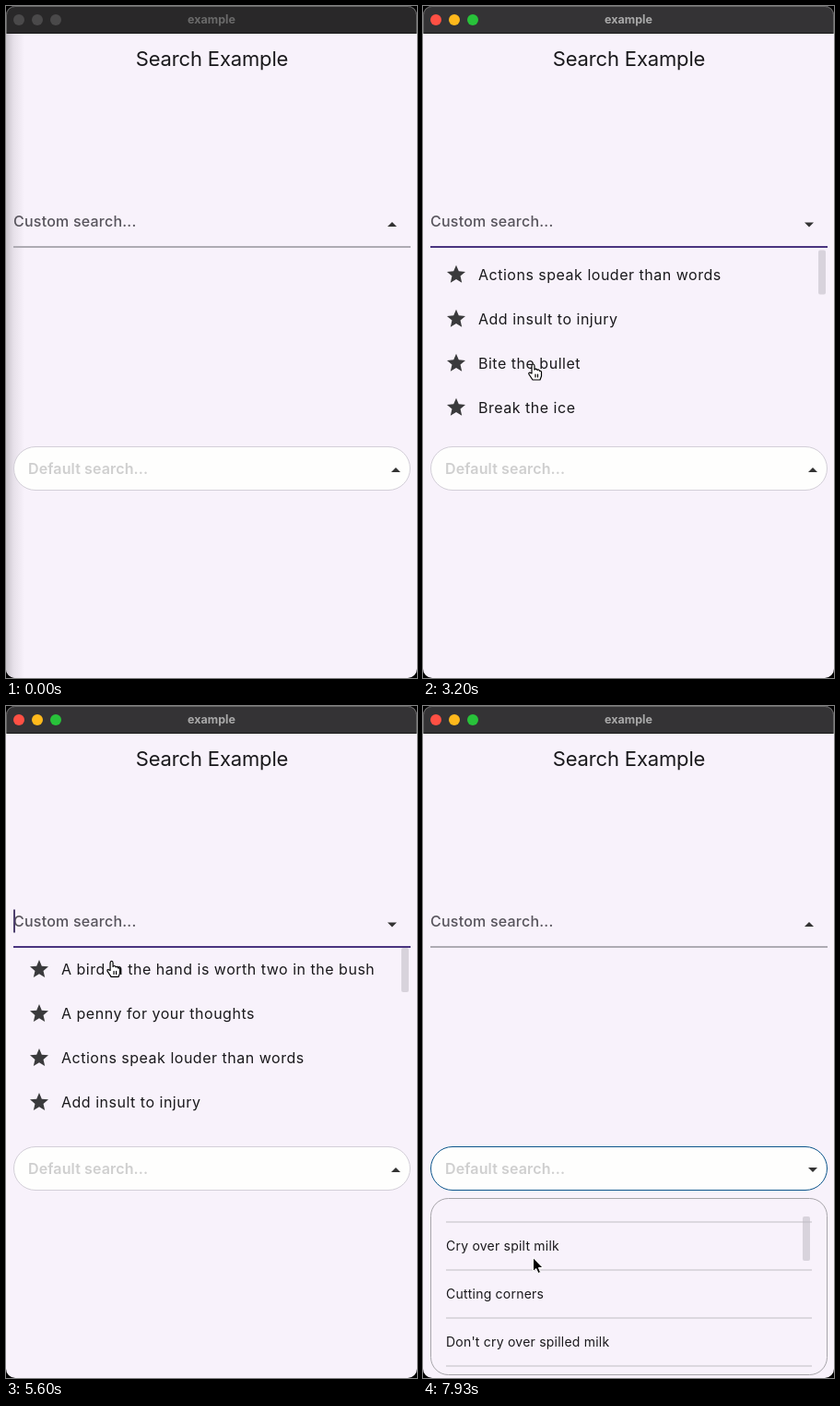
Animation of 446 by 728 pixels, one loop 8 s. Source, as an HTML page:

```html
<!DOCTYPE html>
<html lang="en">
<head>
<meta charset="utf-8">
<title>example</title>
<style>
  html, body { margin: 0; width: 100%; height: 100%; overflow: hidden; background: #000; }
  svg { display: block; width: 446px; height: 728px; }
  text { font-family: Inter, Roboto, sans-serif; fill: #1a191c; white-space: pre; }
  .app-title { font-size: 22px; letter-spacing: -0.15px; }
  .window-title { font-size: 12.5px; font-weight: 700; }
  .hint { font-size: 16px; font-weight: 500; letter-spacing: 0.22px; fill: #57545c; }
  .pale { font-weight: 600; letter-spacing: 0.13px; fill: #cfcfcf; }
  .item { font-size: 16px; letter-spacing: 0.51px; }
  .small { font-size: 14px; letter-spacing: 0.22px; }
  .star { fill: #3a3a3c; }
  .thumb { fill: #bebac2; fill-opacity: 0.55; }
  .cursor path { stroke-linejoin: round; stroke-linecap: round; }
</style>
</head>
<body>
<svg viewBox="0 0 446 728">
  <defs>
    <linearGradient id="edge">
      <stop offset="0" stop-color="#c6c2c9"/>
      <stop offset=".4" stop-color="#e6e0e9"/>
      <stop offset="1" stop-color="#f8f2fb"/>
    </linearGradient>
    <clipPath id="window"><rect width="446" height="728" rx="10"/></clipPath>
    <clipPath id="customView"><rect x="8" y="262" width="431" height="198"/></clipPath>
    <clipPath id="defaultView"><rect x="9" y="541" width="429" height="176"/></clipPath>
  </defs>

  <g clip-path="url(#window)">
    <rect width="446" height="728" fill="#f8f2fb"/>
    <rect id="shadow" y="30" width="20" height="698" fill="url(#edge)"/>
    <rect id="bar" width="446" height="30"/>
    <path d="M0 29.5H446" stroke="#181818"/>
    <path d="M.5 30V10A9.5 9.5 0 0 1 10 .5H436A9.5 9.5 0 0 1 445.5 10V30" fill="none" stroke="#666"/>
  </g>
  <g id="lights"><circle cx="14" cy="15" r="6"/><circle cx="34" cy="15" r="6"/><circle cx="54" cy="15" r="6"/></g>
  <text id="windowTitle" class="window-title" x="223" y="19" text-anchor="middle">example</text>
  <text class="app-title" x="223.5" y="65" text-anchor="middle">Search Example</text>

  <g id="customList" clip-path="url(#customView)">
    <rect id="hover" x="8" width="431" height="48" fill="#ebe4ec"/>
    <g id="customRows"></g>
    <rect id="customThumb" class="thumb" x="429" width="8" height="48" rx="2"/>
  </g>
  <text class="hint" x="8" y="239">Custom search...</text>
  <path id="underline" d="M8 261H439" stroke-width="2"/>
  <path id="customArrow" fill="#333"/>

  <rect id="pill" x="8.5" y="477.5" width="430" height="47" rx="23.5"/>
  <text class="hint pale" x="24" y="507">Default search...</text>
  <path id="defaultArrow" fill="#333"/>

  <g id="defaultList">
    <rect x="8.5" y="533.5" width="430" height="191" rx="19" fill="none" stroke="#a7a5aa"/>
    <g clip-path="url(#defaultView)">
      <g id="defaultRows"></g>
      <rect id="defaultThumb" class="thumb" x="412" width="8" height="48" rx="2"/>
    </g>
  </g>
  <path id="customCaret" d="M9 220.5V245.5" stroke="#4c3f6e" stroke-width="2"/>
  <path id="defaultCaret" d="M25 488.5V513.5" stroke="#4c3f6e" stroke-width="2"/>

  <g id="ibeam" class="cursor">
    <path d="M-3-7Q0-7 0-5Q0-7 3-7M0-5V5M-3 7Q0 7 0 5Q0 7 3 7M-2 2H2" fill="none" stroke="#fff" stroke-width="3"/>
    <path d="M-3-7Q0-7 0-5Q0-7 3-7M0-5V5M-3 7Q0 7 0 5Q0 7 3 7M-2 2H2" fill="none" stroke="#000" stroke-width="1.2"/>
  </g>
  <g id="hand" class="cursor">
    <path d="M-3 1V-7Q-3-9-1.5-9Q0-9 0-7V-3Q2-5 3-2.500Q5-4 5.500-1.500Q8-2 7.500 1V4L6 8H-2L-6 2Q-7-1-3 1ZM1 2V5M3.500 2V5" fill="#fff" stroke="#000" stroke-width="1.2"/>
  </g>
  <g id="arrow" class="cursor">
    <path d="M0 0V14.500L3.300 11.500L5.500 16.500L8 15.400L5.900 10.500H10.300Z" fill="#000" stroke="#fff"/>
  </g>
</svg>

<script>
const LOOP = 8000;
const ACTIVATE = 70, ENTER = 600, OPEN_CUSTOM = 2500, CLOSE_CUSTOM = 6050, OPEN_DEFAULT = 7100;
const ROW = 48, SMALL_ROW = 52;
const STAR = "M12 17.27L18.18 21l-1.64-7.03L22 9.24l-7.19-.61L12 2 9.19 8.63 2 9.24l5.46 4.73L5.82 21z";
const idioms = [
  "A bird in the hand is worth two in the bush", "A penny for your thoughts",
  "Actions speak louder than words", "Add insult to injury", "Bite the bullet",
  "Break the ice", "Burn the midnight oil", "Call it a day", "Caught red-handed",
  "Chip on your shoulder", "Cry over spilt milk", "Cutting corners",
  "Don't cry over spilled milk", "Every cloud has a silver lining", "Get out of hand"
];

const $ = id => document.getElementById(id);
const set = (id, attrs) => {
  for (const name in attrs) $(id).setAttribute(name, attrs[name]);
};
const show = (id, on) => set(id, { visibility: on ? "inherit" : "hidden" });
const between = (t, a, b) => t >= a && t < b;
const blink = (t, start) => Math.floor((t - start) / 500) % 2 === 0;

// Eased value along [time, value] keys.
function track(t, keys) {
  if (t <= keys[0][0]) return keys[0][1];
  for (let i = 1; i < keys.length; i++) {
    const [t0, v0] = keys[i - 1], [t1, v1] = keys[i];
    if (t < t1) {
      const p = (t - t0) / (t1 - t0);
      return v0 + (v1 - v0) * p * p * (3 - 2 * p);
    }
  }
  return keys[keys.length - 1][1];
}

$("customRows").innerHTML = idioms.map((s, i) => `<g transform="translate(0 ${261 + ROW * i})">
  <path class="star" d="${STAR}" transform="translate(24 12)"/><text class="item" x="60" y="30">${s}</text></g>`).join("");
$("defaultRows").innerHTML = idioms.map((s, i) => `<g transform="translate(0 ${541 + SMALL_ROW * i})">
  <text class="item small" x="25" y="31">${s}</text><path d="M25 52H422" stroke="#dcd8df" stroke-width="2"/></g>`).join("");

const pointerX = [[ENTER, -8], [2000, 86], [2460, 86], [2960, 121], [5250, 121], [5800, 114], [6150, 114], [6700, 121], [7150, 121], [7400, 119.5]];
const pointerY = [[ENTER, 330], [2000, 235], [2460, 235], [2960, 397], [5250, 397], [5800, 238], [6150, 238], [6700, 510], [7150, 510], [7400, 598]];
const customScroll = [[2900, 0], [3930, 438], [4050, 438], [4600, 79], [4850, 79], [5200, 0]];
const defaultScroll = [[7350, 0], [7930, 502]];

// True when a track has rested long enough for the hover tint to appear.
const settled = (t, keys) => track(t, keys) === track(t - 100, keys);

function arrowPath(x, y, open) {
  const d = open ? -1 : 1;
  return `M${x - 5} ${y + 2.5 * d}H${x + 5}L${x} ${y - 2.5 * d}Z`;
}

function drawWindow(t) {
  const active = t >= ACTIVATE;
  show("shadow", !active);
  set("bar", { fill: active ? "#343335" : "#292829" });
  set("windowTitle", { style: `fill:${active ? "#a9a9a9" : "#6a6a6a"}` });
  ["#ff5044", "#ffb91c", "#28c23a"].forEach((color, i) =>
    $("lights").children[i].setAttribute("fill", active ? color : "#4a494a"));
}

function drawCustom(t, y) {
  const open = between(t, OPEN_CUSTOM, CLOSE_CUSTOM);
  const offset = track(t, customScroll);
  show("customList", open);
  set("customRows", { transform: `translate(0 ${-offset})` });
  set("customThumb", {
    y: 262 + offset * 0.0274,
    opacity: track(t, [[2900, 0], [3000, 1], [5700, 1], [6000, 0]])
  });
  const fingertip = y - 9;
  const row = Math.floor((fingertip - 261 + offset) / ROW);
  set("hover", { y: 261 + row * ROW - offset });
  show("hover", open && fingertip > 261 && settled(t, customScroll) && settled(t, pointerY));
  show("customCaret", open && blink(t, OPEN_CUSTOM));
  set("underline", { stroke: !open ? "#aeabb3" : t < 2660 ? "#757082" : "#4a3580" });
  set("customArrow", { d: arrowPath(419, open ? 237 : 236.5, open) });
}

function drawDefault(t, y) {
  const open = t >= OPEN_DEFAULT;
  const offset = track(t, defaultScroll);
  const hovered = t >= CLOSE_CUSTOM && between(y, 477, 525);
  show("defaultList", open);
  show("defaultCaret", open && blink(t, OPEN_DEFAULT));
  set("defaultRows", { transform: `translate(0 ${-offset})` });
  set("defaultThumb", { y: 541 + offset * 0.0239, opacity: track(t, [[7350, 0], [7450, 1]]) });
  set("pill", { fill: hovered ? "#f0f0ee" : "#fefefd", stroke: open ? "#0d568c" : "#d3cfd8" });
  set("defaultArrow", { d: arrowPath(423, 502.5, open) });
}

function drawPointer(t, x, y) {
  const overList = between(t, OPEN_CUSTOM, CLOSE_CUSTOM) && between(y, 268, 460);
  const overField = between(y, 215, 268) || between(y, 477, 525);
  const shape = overList ? "hand" : overField ? "ibeam" : "arrow";
  for (const id of ["ibeam", "hand", "arrow"]) {
    show(id, t >= ENTER && id === shape);
    set(id, { transform: `translate(${x} ${y})` });
  }
}

function frame() {
  const t = performance.now() % LOOP;
  const x = track(t, pointerX), y = track(t, pointerY);
  drawWindow(t);
  drawCustom(t, y);
  drawDefault(t, y);
  drawPointer(t, x, y);
  requestAnimationFrame(frame);
}
frame();
</script>
</body>
</html>
```
